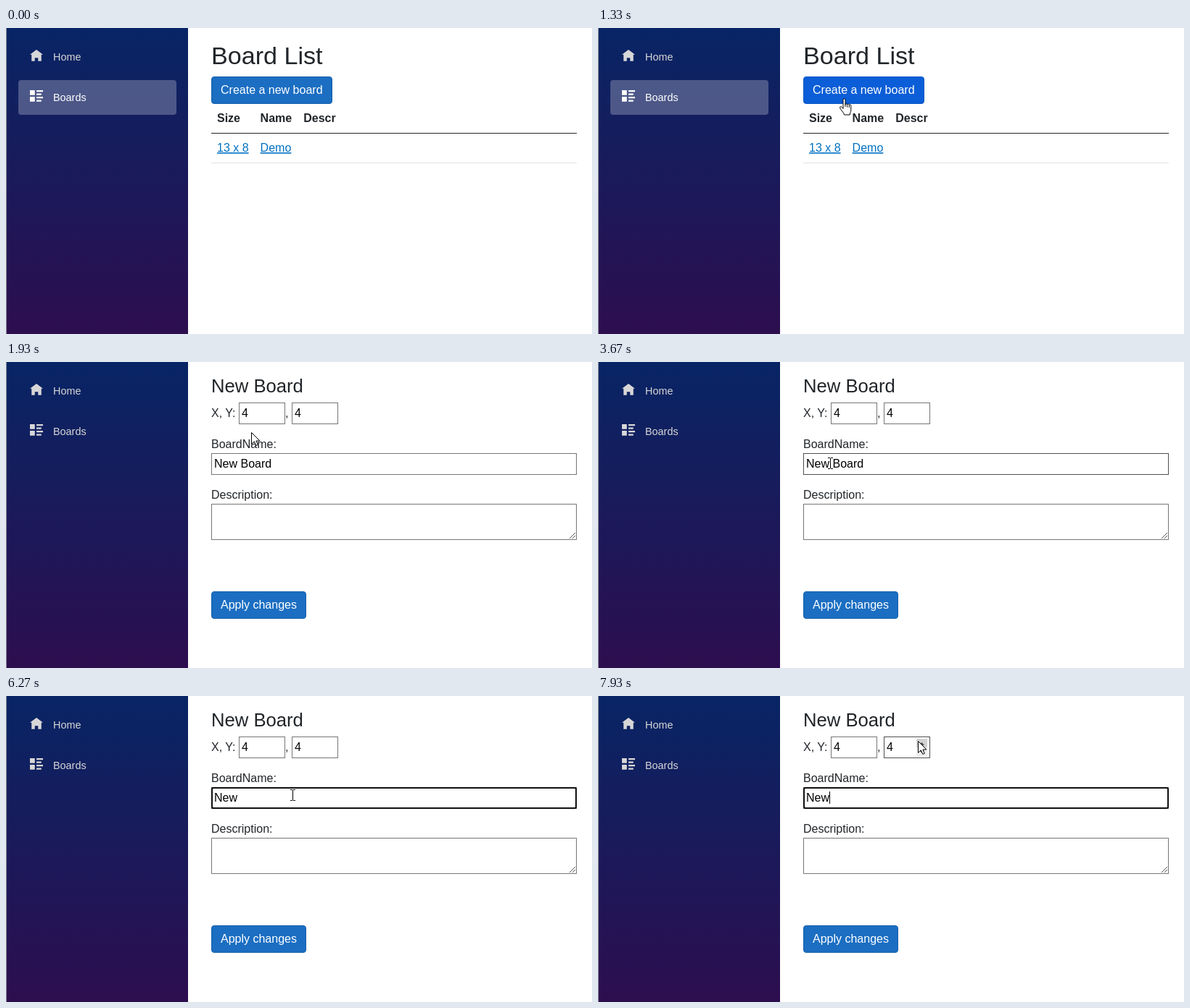
An HTML page for the animation above (8000 ms loop, 808x423 px).

```html
<!DOCTYPE html>
<html lang="en">
<head>
<meta charset="utf-8">
<title>Board editor</title>
<style>
  html, body { margin: 0; width: 100%; height: 100%; overflow: hidden; background: #fff; }
  svg { display: block; }
  text { font: 16px "Liberation Sans", Arial, sans-serif; fill: #212529; white-space: pre; }
  .nav { font-size: 14.4px; }
  .bold { font-weight: bold; }
  .link { fill: #0071c1; text-decoration: underline; }
  .light { fill: #fff; }
  .value { fill: #000; }
  .field { fill: #fff; stroke: #767676; }
  .btn { fill: #1b6ec2; stroke: #1861ac; }
</style>
</head>
<body>
<svg width="808" height="423" viewBox="0 0 808 423">
  <defs>
    <linearGradient id="night" x2="0" y2="1">
      <stop offset="0" stop-color="#082565"/>
      <stop offset="1" stop-color="#2d0e4f"/>
    </linearGradient>
  </defs>
  <rect width="808" height="423" fill="#fff"/>
  <rect width="1" height="423" fill="#85858c"/>
  <rect x="1" width="250" height="423" fill="url(#night)"/>

  <rect id="homeBg" x="17" y="16" width="218" height="48" rx="4" fill="#fff" fill-opacity=".1"/>
  <rect id="boardsBg" x="17" y="72" width="218" height="48" rx="4" fill="#fff" fill-opacity=".25"/>
  <g id="homeNav" fill="#d7d7d7">
    <path transform="translate(33 30) scale(2.25)" d="M4 0l-4 3h1v4h2v-2h2v2h2v-4l1 0z"/>
    <text class="nav" x="65" y="45" style="fill:inherit">Home</text>
  </g>
  <g id="boardsNav" fill="#d7d7d7">
    <path transform="translate(33 86) scale(2.25)" d="M0 0v3h3v-3zM4 0v1h4v-1zM4 2v1h3v-1zM0 4v3h3v-3zM4 4v1h4v-1zM4 6v1h3v-1z"/>
    <text class="nav" x="65" y="101" style="fill:inherit">Boards</text>
  </g>

  <g id="listPage">
    <text x="283" y="50" style="font-size:34.12px">Board List</text>
    <rect id="create" class="btn" x="283.5" y="67.5" width="166" height="37" rx="3.5"/>
    <text class="light" x="296" y="91">Create a new board</text>
    <text class="bold" x="291" y="130">Size</text>
    <text class="bold" x="350.6" y="130">Name</text>
    <text class="bold" x="410.2" y="130">Descr</text>
    <rect x="283" y="145" width="504" height="1" fill="#212529"/>
    <text class="link" x="291" y="171">13 x 8</text>
    <text class="link" x="350.6" y="171">Demo</text>
    <rect x="283" y="186" width="504" height="1" fill="#dee2e6"/>
  </g>

  <g id="formPage">
    <text x="283" y="42" style="font-size:25.65px">New Board</text>
    <text x="283" y="76">X, Y:</text>
    <rect class="field" x="321.5" y="56.5" width="63" height="29"/>
    <text class="value" x="325" y="76">4</text>
    <text x="385" y="76">,</text>
    <rect id="yField" class="field" x="394.5" y="56.5" width="63" height="29"/>
    <text class="value" x="398" y="76">4</text>
    <g id="spinner">
      <rect id="spinUp" x="439" y="59" width="15" height="12"/>
      <rect id="spinDown" x="439" y="71" width="15" height="12"/>
      <path d="M443 68l3.5-4 3.5 4zM443 75l3.5 4 3.5-4z" fill="#505050"/>
    </g>

    <text x="283" y="119">BoardName:</text>
    <rect id="nameField" class="field" x="283.5" y="126.5" width="503" height="29"/>
    <rect id="focus" x="284" y="127" width="502" height="28" rx="2" fill="none" stroke="#101010" stroke-width="2"/>
    <rect id="mark" x="319" y="129" height="24" fill="#3367d1"/>
    <text class="value" x="287" y="146">New<tspan id="picked" fill="#fff"></tspan><tspan id="rest"></tspan></text>
    <rect id="caret" x="319" y="132" width="1" height="17" fill="#000"/>

    <text x="283" y="189">Description:</text>
    <rect class="field" x="283.5" y="196.5" width="503" height="49"/>
    <path d="M777 244l8-8M781 244l4-4" stroke="#555" fill="none"/>
    <rect class="btn" x="283.5" y="317.5" width="130" height="37" rx="3.5"/>
    <text class="light" x="296" y="341">Apply changes</text>
  </g>

  <g id="cursor" stroke="#000" fill="#fff" stroke-linejoin="round">
    <path id="arrow" d="M.5.5V16.5L4.3 12.9 6.8 18.5 9.3 17.4 6.9 12H12Z"/>
    <g id="hand" transform="translate(-5)">
      <path d="M5 2.2a1.5 1.5 0 0 1 3 0V9a1.3 1.3 0 0 1 2.6.2a1.3 1.3 0 0 1 2.7.6a1.2 1.2 0 0 1 2.5.8V17c0 2-1.5 3-1.5 6H6.5C6.5 20 1 16 .6 13.2c-.3-1.6 1.6-2 2.6-.9L5 14.5Z"/>
      <path d="M8 9v3M10.6 9.5v3M13.3 10v3" fill="none"/>
    </g>
    <path id="beam" d="M-3-7.5h3M1-7.5h3M-3 7.5h3M1 7.5h3M.5-7V7" fill="none"/>
  </g>
</svg>
<script>
const LOOP = 8000, TICK = 1000 / 15;
const el = {};
document.querySelectorAll('[id]').forEach(e => el[e.id] = e);

// Pointer path: tick, x, y
const path = [
  [8, 170, 1], [17, 337, 97], [19, 337, 97], [20, 338, 97], [43, 338, 97],
  [48, 325, 133], [50, 325, 133], [55, 320, 140], [67, 320, 140], [73, 395, 137],
  [100, 395, 137], [106, 414, 83], [110, 430, 76], [113, 430, 76], [119, 441, 62]
];
const at = { press: 25, form: 26, settle: 29, focus: 64, drag: 68, erase: 86 };
const tail = ' Board';
const edges = [319, 323.4, 334.1, 343, 351.9, 357.2, 366.1];

const show = (e, on) => e.setAttribute('visibility', on ? 'inherit' : 'hidden');
const inside = (p, x, y, w, h) => p.x >= x && p.x < x + w && p.y >= y && p.y < y + h;

function pointer(k) {
  let i = 0;
  while (i < path.length - 2 && path[i + 1][0] <= k) i++;
  const [k0, x0, y0] = path[i], [k1, x1, y1] = path[i + 1];
  const u = Math.min(1, Math.max(0, (k - k0) / (k1 - k0)));
  return { x: Math.round(x0 + (x1 - x0) * u), y: Math.round(y0 + (y1 - y0) * u) };
}

function drawList(k, p, seen) {
  const home = seen && inside(p, 17, 16, 218, 48);
  const over = seen && inside(p, 283, 67, 167, 38);
  show(el.homeBg, home);
  el.homeNav.setAttribute('fill', home ? '#fff' : '#d7d7d7');
  el.create.style.fill = k >= at.press ? '#0a58ca' : over ? '#0b5ed7' : '';
  el.create.style.stroke = over ? '#0a58ca' : '';
  return home || over ? 'hand' : 'arrow';
}

function drawForm(k, p) {
  const overName = inside(p, 283, 126, 504, 30);
  const overY = inside(p, 394, 56, 64, 30);
  const overSpin = overY && p.x >= 439;
  el.nameField.style.stroke = overName ? '#4f4f4f' : '';
  el.yField.style.stroke = overY ? '#4f4f4f' : '';
  show(el.spinner, overY);
  el.spinUp.setAttribute('fill', overSpin && p.y < 71 ? '#d2d2d2' : '#efefef');
  el.spinDown.setAttribute('fill', overSpin && p.y >= 71 ? '#d2d2d2' : '#efefef');

  let n = 0;
  if (k >= at.drag && k < at.erase)
    while (n < tail.length && p.x > (edges[n] + edges[n + 1]) / 2) n++;
  const erased = k >= at.erase;
  el.picked.textContent = erased ? '' : tail.slice(0, n);
  el.rest.textContent = erased ? '' : tail.slice(n);
  el.mark.setAttribute('width', edges[n] - edges[0]);
  show(el.focus, k >= at.focus);
  const blink = erased ? Math.floor((k - at.erase) / 8) % 2 === 0 : k >= at.focus && n === 0;
  show(el.caret, blink);

  if (k < at.settle) return 'hand';
  return overName || (overY && !overSpin) ? 'beam' : 'arrow';
}

function draw(t) {
  const k = Math.floor((t + 3.4) / TICK);
  const p = pointer(k), seen = k >= path[0][0], form = k >= at.form;
  show(el.listPage, !form);
  el.formPage.setAttribute('visibility', form ? 'visible' : 'hidden');
  show(el.boardsBg, !form);
  el.boardsNav.setAttribute('fill', form ? '#d7d7d7' : '#fff');
  const listShape = drawList(k, p, seen && !form), formShape = drawForm(k, p);
  const shape = form ? formShape : listShape;
  show(el.cursor, seen);
  el.cursor.setAttribute('transform', `translate(${p.x} ${p.y})`);
  for (const s of ['arrow', 'hand', 'beam']) show(el[s], seen && s === shape);
}

const start = performance.now();
function loop() {
  draw((performance.now() - start) % LOOP);
  requestAnimationFrame(loop);
}
loop();
</script>
</body>
</html>
```
